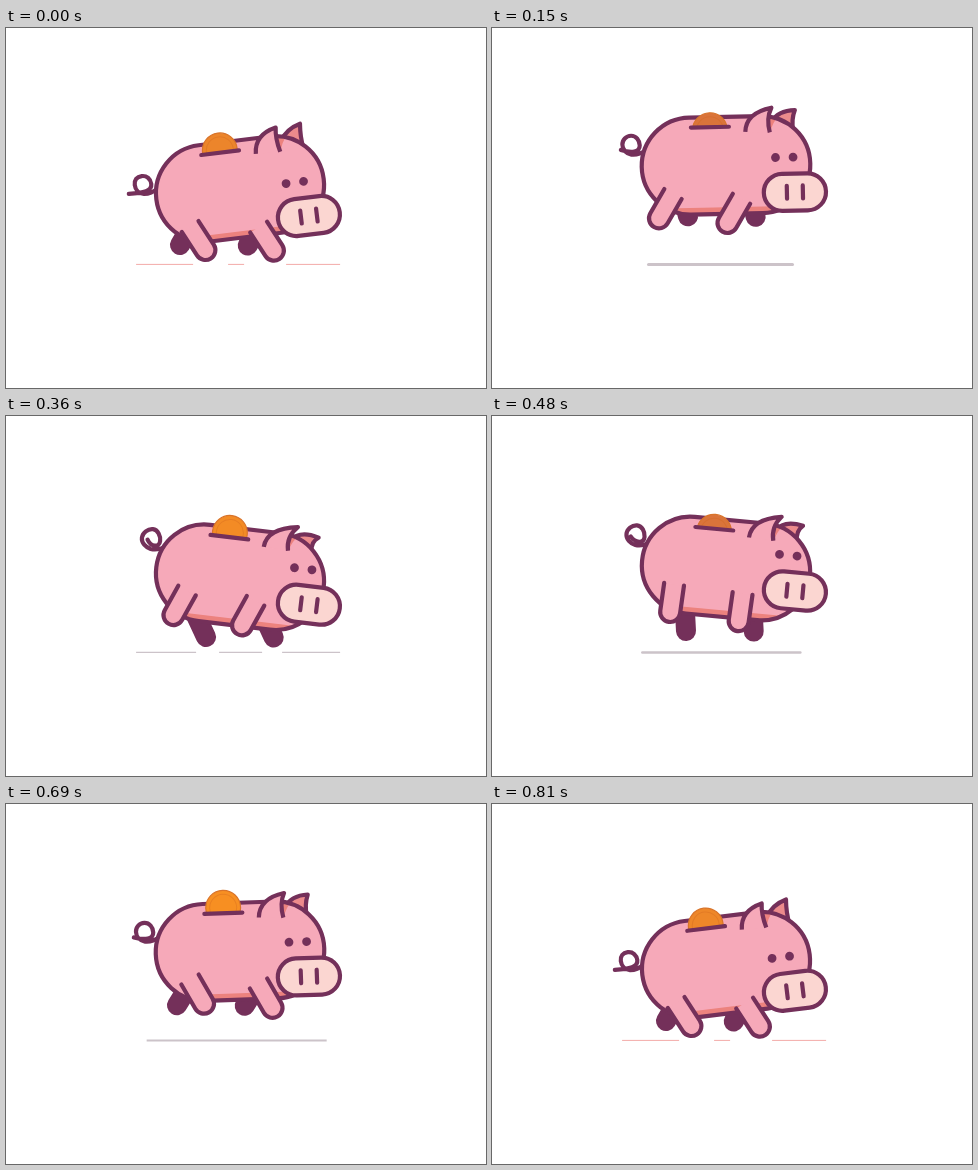
An HTML page with a canvas for the animation above (0.84 s loop, 480 px wide and 360 px high).

```html
<!DOCTYPE html>
<html lang="en">
<head>
<meta charset="utf-8">
<title>Trotting piggy bank</title>
<style>
  html, body { margin: 0; width: 100%; height: 100%; overflow: hidden; background: #fff; }
  canvas { display: block; }
</style>
</head>
<body>
<canvas id="stage" width="480" height="360"></canvas>
<script>
const ctx = document.getElementById('stage').getContext('2d');
const LOOP = 840, STEP = 30, HOP = LOOP / 2;
const DARK = '#74305a', PINK = '#f6a9b9', SALMON = '#ec827e', SNOUT = '#fbd6d1';

// Smooth periodic curve through a few keyed values.
function track(times, period, values) {
  const n = times.length;
  const at = k => times[(k + n) % n] + Math.floor(k / n) * period;
  const val = k => values[(k + n) % n];
  const slope = k => (val(k + 1) - val(k - 1)) / (at(k + 1) - at(k - 1));
  return t => {
    t %= period;
    let i = n - 1;
    while (times[i] > t) i--;
    const span = at(i + 1) - at(i), u = (t - at(i)) / span, v = 1 - u;
    return v * v * ((1 + 2 * u) * val(i) + u * span * slope(i))
         + u * u * ((1 + 2 * v) * val(i + 1) - v * span * slope(i + 1));
  };
}
const hop = (...values) => track([0, 60, 150, 270, 360, 390], HOP, values);
const stride = (...values) => track([0, 150, 360, 480, 570, 690, 810], LOOP, values);

const bodyY = hop(161, 152.5, 137.3, 147.2, 161.2, 160.8);
const bodyTilt = stride(-7, -1.2, 6.8, 5.3, 1.1, -2, -7);
const coinHeight = hop(20.3, 15, 15, 23.5, 22.3, 21);
const shadowHalf = hop(102, 79, 72, 90, 102, 102);
const shadowWidth = hop(1, 2.5, 3, 2, 1.4, 1);
const snoutDrop = stride(27, 26.8, 27.5, 22.5, 23.3, 25.3, 26);
const tailY = stride(-16.8, -22.7, -27.5, -25, -26.3, -22.9, -16.5);
const nearAngle = stride(-33, 30, 29, 8, -13, -30, -33);
const nearDrop = stride(61, 53, 37.8, 43.5, 49, 52.5, 61.2);
const farAngle = stride(30, -15, -25, -3, 18, 32, 30);
const farX = stride(174, 196, 200, 194, 182, 171, 174);
const farDrop = stride(56, 51, 59.8, 62.5, 62, 54, 56.2);

function group(x, y, degrees, draw) {
  ctx.save();
  ctx.translate(x, y);
  ctx.rotate(degrees * Math.PI / 180);
  draw();
  ctx.restore();
}

function shape(path, fill, stroke = DARK, width = 4.2) {
  const p = typeof path === 'string' ? new Path2D(path) : path;
  if (fill) {
    ctx.fillStyle = fill;
    ctx.fill(p);
  }
  if (stroke) {
    ctx.strokeStyle = stroke;
    ctx.lineWidth = width;
    ctx.stroke(p);
  }
}

function pill(w, h) {
  const p = new Path2D();
  p.roundRect(-w / 2, -h / 2, w, h, h / 2);
  return p;
}

function disc(x, y, r) {
  const p = new Path2D();
  p.arc(x, y, r, 0, 7);
  return p;
}

function drawShadow(t) {
  const half = shadowHalf(t), width = shadowWidth(t), phase = t % HOP;
  const touching = phase >= 380 || phase < 20;
  const middle = 228.5 + (half - 72) * 0.12;
  ctx.save();
  ctx.lineCap = width > 2.2 ? 'round' : 'butt';
  if (width < 1.7) ctx.setLineDash(touching ? [57, 35, 16, 42, 60, 0] : [60, 23, 43, 20, 60, 0]);
  shape(`M${middle - half},236.4H${middle + half}`, null, touching ? '#f3aaa8' : '#ccc3c9', width);
  ctx.restore();
}

function drawTail(t, tilt) {
  const curl = (tilt + 7) / 14;
  ctx.save();
  ctx.translate(-94 + 0.28 * tilt, tailY(t));
  const r = 8 + 2 * curl;
  shape(`M15,6Q7,11 0,10C-5,9 ${-r},5 ${-r},0C${-r},-5 -5,${-r} 0,${-r}
    C5,${-r} 8.5,-4 8.5,1C8.5,8 0,${9 - curl} ${-15 + 11 * curl},${8 - 7 * curl}`);
  ctx.restore();
}

function drawBody(tilt) {
  const body = pill(168.6, 97);
  shape(`M46,-42Q53,-54 ${70.5 + 0.43 * tilt},${-53 + 0.64 * tilt}Q66,-44 68,-33Z`, '#ec8b8c');
  shape(body, PINK, null);
  ctx.save();
  ctx.clip(body);
  ctx.fillStyle = SALMON;
  ctx.fillRect(-90, 42, 180, 10);
  shape('M42,-55L54,-48Q47,-42 45,-32Z', SALMON, null);
  ctx.restore();
  shape(body);
}

function drawCoin(t) {
  const height = coinHeight(t), k = (height - 15) / 8.5;
  ctx.save();
  ctx.translate(-15.3, -38.5);
  ctx.save();
  ctx.beginPath();
  ctx.rect(-25, -40, 50, 40);
  ctx.clip();
  const y = 18 - height;
  shape(disc(0, y, 17.4), `rgb(${218 + 29 * k},${116 + 27 * k},${58 - 24 * k})`, '#d9742a', 1.2);
  shape(disc(0, y, 13.5), null, 'rgba(205,100,30,.35)', 1);
  ctx.restore();
  shape('M-19,0H19');
  ctx.restore();
}

function drawEar(tilt) {
  const tip = `${47.3 + 0.63 * tilt},-56.6`;
  shape(`M20,-33Q21,-52 ${tip}Q41,-46 44.5,-32`, PINK);
}

function nearLeg(x, y, angle) {
  group(x, y, angle, () => shape('M-10,-28V0A10,10 0 0 0 10,0V-28', PINK));
}

function farLeg(x, y, angle) {
  group(x, y, angle, () => shape('M0,-25V0', null, DARK, 20));
}

function drawFace() {
  shape(pill(62.2, 37), SNOUT);
  shape('M-8,-6.5V6.5M8,-6.5V6.5');
  shape(disc(-18.7, -35, 4.4), DARK, null);
  shape(disc(-1.1, -35, 4.4), DARK, null);
}

function draw(t) {
  const y = bodyY(t), tilt = bodyTilt(t);
  ctx.clearRect(0, 0, 480, 360);
  ctx.lineCap = ctx.lineJoin = 'round';
  drawShadow(t);

  const far = farX(t), farY = y + farDrop(t);
  farLeg(far, farY, farAngle(t));
  farLeg(far + 67.7, farY + 0.5, farAngle(t));

  group(234, y, tilt, () => {
    drawTail(t, tilt);
    drawBody(tilt);
    drawCoin(t);
    ctx.lineCap = 'butt';
    drawEar(tilt);
  });

  const angle = nearAngle(t), footY = y + nearDrop(t);
  const footX = 182.5 - 31 * Math.sin(angle * Math.PI / 180);
  nearLeg(footX, footY, angle);
  nearLeg(footX + 68.5, footY + 5.5 + 0.7 * tilt, angle);

  ctx.lineCap = 'round';
  group(302.9, y + snoutDrop(t), tilt, drawFace);
}

const start = performance.now();
function frame() {
  const t = (performance.now() - start) % LOOP;
  draw(Math.floor(t / STEP) * STEP);
  requestAnimationFrame(frame);
}
frame();
</script>
</body>
</html>
```
